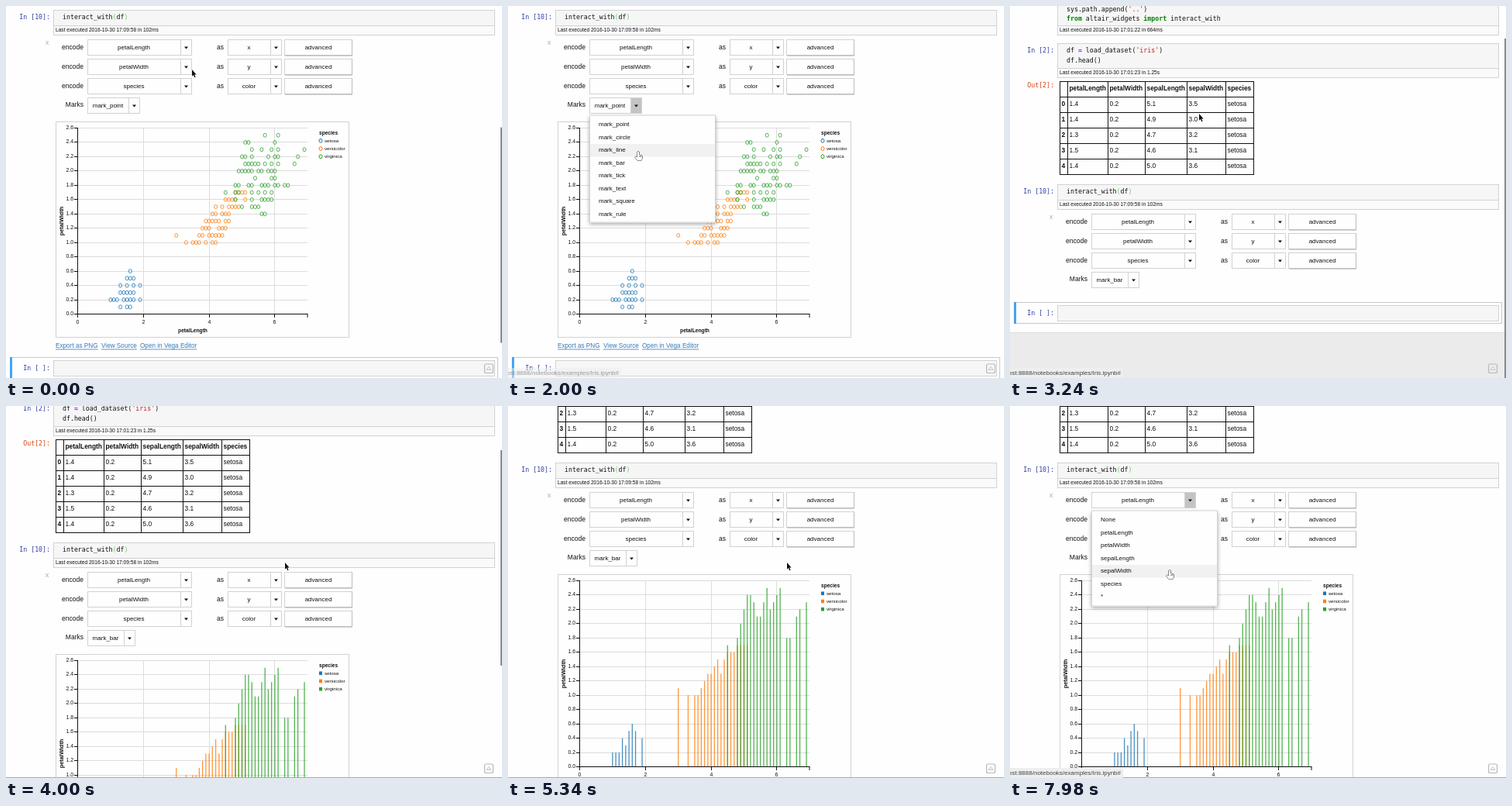
Write an HTML page with a canvas that moves like this. It is 640x480 px and loops after 8000 ms.

```html
<!DOCTYPE html>
<html lang="en">
<head>
<meta charset="utf-8">
<title>Notebook chart widget</title>
<style>
html, body { margin: 0; width: 100%; height: 100%; overflow: hidden; background: #fefefe; }
canvas { display: block; width: 640px; height: 480px; }
</style>
</head>
<body>
<canvas id="stage"></canvas>
<script>
const canvas = document.getElementById('stage');
const ctx = canvas.getContext('2d');
const ratio = window.devicePixelRatio || 1;
canvas.width = 640 * ratio;
canvas.height = 480 * ratio;

const LOOP = 8000;
const SANS = '"Liberation Sans", Arial, sans-serif';
const MONO = '"DejaVu Sans Mono", monospace';
const INK = '#111', PAGE = '#fefefe', CELL = '#f6f6f6', LINE = '#d2d2d2', GRID = '#dcdcdc';

// Moments at which the interface switches state.
const MARK_MENU = 1500, MARK_PICKED = 2800, CHART_BACK = 3350, FIELD_MENU = 7150;

const clamp = v => Math.min(1, Math.max(0, v));
const ramp = (t, from, to) => clamp((t - from) / (to - from));
const smooth = u => u * u * (3 - 2 * u);
const noise = (a, b) => Math.abs(Math.sin(a * 12.9898 + b * 78.233) * 43758.5453) % 1;

// Keys are [position, ...values]; eases between neighbours.
function track(keys, t) {
  let i = 0;
  while (i < keys.length - 2 && t >= keys[i + 1][0]) i++;
  const [a, b] = [keys[i], keys[i + 1]];
  const u = smooth(ramp(t, a[0], b[0]));
  return a.slice(1).map((v, k) => v + (b[k + 1] - v) * u);
}

// In tenths: for every petal length, widths are scattered between a low and a high curve.
const species = [
  { name: 'setosa', color: '#1f77b4', density: .75, gaps: [18],
    low: [[10, 2], [14, 1], [19, 2]],
    high: [[10, 2], [12, 2], [13, 4], [14, 3], [16, 6], [19, 4]] },
  { name: 'versicolor', color: '#ff7f0e', density: .6, gaps: [31, 32, 34],
    low: [[30, 11], [35, 10], [41, 10], [51, 16]],
    high: [[30, 11], [35, 10], [40, 13], [42, 15], [43, 13], [45, 16], [51, 17]] },
  { name: 'virginica', color: '#2ca02c', density: .4, gaps: [46, 47, 62, 65, 68],
    low: [[45, 17], [51, 15], [56, 14], [62, 18], [69, 23]],
    high: [[45, 17], [48, 18], [51, 24], [55, 21], [57, 25], [58, 22], [61, 25], [63, 18], [69, 23]] },
];
for (const kind of species) {
  kind.points = [];
  const { low, high, gaps, density } = kind;
  for (let length = high[0][0]; length <= high.at(-1)[0]; length++) {
    if (gaps.includes(length)) continue;
    const top = Math.round(track(high, length));
    for (let w = Math.min(top, Math.round(track(low, length))); w <= top; w++)
      if (w === top || noise(length, w) < density) kind.points.push([length / 10, w / 10, w === top]);
  }
}

function text(str, x, y, { size = 8, color = INK, align = 'left', bold = false, font = SANS } = {}) {
  ctx.font = `${bold ? 'bold ' : ''}${size}px ${font}`;
  ctx.fillStyle = color;
  ctx.textAlign = align;
  ctx.textBaseline = 'middle';
  ctx.fillText(str, x, y);
}

// Each part is [string, color, bold].
function code(parts, y) {
  let x = 73;
  for (const [str, color = INK, bold] of parts) {
    text(str, x, y, { size: 8.25, font: MONO, color, bold });
    x += ctx.measureText(str).width;
  }
}

function fill(x, y, w, h, color) {
  ctx.fillStyle = color;
  ctx.fillRect(x, y, w, h);
}

function box(x, y, w, h, color, border = LINE) {
  fill(x, y, w, h, color);
  ctx.strokeStyle = border;
  ctx.lineWidth = 1;
  ctx.strokeRect(x + .5, y + .5, w - 1, h - 1);
}

function line(x1, y1, x2, y2, color = INK, width = 1) {
  ctx.strokeStyle = color;
  ctx.lineWidth = width;
  ctx.beginPath();
  ctx.moveTo(x1, y1);
  ctx.lineTo(x2, y2);
  ctx.stroke();
}

function shape(path, color, outline) {
  const p = new Path2D(path);
  if (outline) {
    ctx.strokeStyle = outline;
    ctx.lineWidth = 1;
    ctx.stroke(p);
  }
  ctx.fillStyle = color;
  ctx.fill(p);
}

function executedCell(top, bottom, stamp) {
  box(61, top, 570, bottom - top - 12, CELL);
  box(61, bottom - 13, 570, 13, '#fafafa');
  text('Last executed 2016-10-30 ' + stamp, 64, bottom - 7, { size: 6.6 });
}

function prompt(label, y, color = '#303f9f') {
  text(label, 57, y, { size: 8.25, font: MONO, align: 'right', color });
}

function codeCells() {
  const key = '#008000', str = '#ba2121', bracket = '#5fcf5f';
  executedCell(-190, -119, '17:01:22 in 664ms');
  code([['sys.path.append('], ["'..'", str], [')']], -152);
  code([['from', key, true], [' altair_widgets '], ['import', key, true], [' interact_with']], -140);

  executedCell(-109, -64, '17:01:23 in 1.25s');
  prompt('In [2]:', -99);
  code([['df '], ['=', '#a2f', true], [' load_dataset('], ["'iris'", str], [')']], -99);
  code([['df.head()']], -86);

  executedCell(73, 106, '17:09:58 in 102ms');
  prompt('In [10]:', 83);
  code([['interact_with'], ['(', bracket], ['df'], [')', bracket]], 83);
}

function dataTable() {
  const edges = [64, 74, 126, 174, 228, 278, 314];
  const rows = [
    ' petalLength petalWidth sepalLength sepalWidth species',
    '0 1.4 0.2 5.1 3.5 setosa',
    '1 1.4 0.2 4.9 3.0 setosa',
    '2 1.3 0.2 4.7 3.2 setosa',
    '3 1.5 0.2 4.6 3.1 setosa',
    '4 1.4 0.2 5.0 3.6 setosa',
  ];
  prompt('Out[2]:', -54, '#d84315');
  rows.forEach((row, r) => row.split(' ').forEach((value, c) =>
    text(value, edges[c] + 2.5, -50 + r * 20, { size: 8.4, bold: !r || !c })));
  edges.forEach(x => line(x + .5, -60, x + .5, 60));
  for (let y = -60; y <= 60; y += 20) line(64, y + .5, 315, y + .5);
}

function select(label, x, y, width, mouse, open = false) {
  const cx = x + width - 7.5;
  const hover = Math.abs(mouse.x - cx) < 7 && Math.abs(mouse.y - mouse.dy - y) < 10;
  box(x, y - 10.5, width, 21, PAGE);
  box(x + width - 15, y - 10.5, 15, 21, open ? '#c4c4c4' : hover ? '#e2e2e2' : PAGE);
  text(label, x + (width - 15) / 2, y, { align: 'center' });
  shape(`M${cx - 2.5} ${y - 1}h5l-2.5 3z`, INK);
}

function controls(t, mouse) {
  text('x', 53, 115.5, { size: 8.5, align: 'center', color: '#aaa' });
  [['petalLength', 'x'], ['petalWidth', 'y'], ['species', 'color']].forEach(([field, channel], i) => {
    const y = 121.5 + i * 25;
    text('encode', 100, y, { size: 8.5, align: 'right' });
    select(field, 105, y, 135, mouse, !i && t > FIELD_MENU);
    text('as', 272, y, { size: 8.5 });
    select(channel, 286, y, 70, mouse);
    box(359, y - 10.5, 88, 21, PAGE);
    line(360, y + 10.5, 447, y + 10.5, '#a8a8a8');
    line(446.5, y - 10, 446.5, y + 10, '#bbb');
    text('advanced', 403, y, { align: 'center' });
  });
  text('Marks', 100, 196, { size: 8.5, align: 'right' });
  if (t > MARK_PICKED) select('mark_bar', 105, 196.5, 62, mouse);
  else select('mark_point', 105, 196.5, 68, mouse, t > MARK_MENU);
}

function chart(bars) {
  const px = v => 92.5 + v * 42.4, py = v => 465.5 - v * 92.3;
  box(64, 217, 379, 279, PAGE);
  for (let i = 0; i <= 13; i++) {
    const y = Math.floor(py(i / 5)) + .5;
    line(93, y, 389, y, GRID);
    line(88, y, 92.5, y);
    text((i / 5).toFixed(1), 87, y, { size: 6.9, align: 'right' });
  }
  for (let v = 0; v < 7; v += 2) {
    const x = Math.floor(px(v)) + .5;
    if (v) line(x, 225.5, x, 465, GRID);
    line(x, 465.5, x, 470);
    text(String(v), x, 476, { size: 6.9, align: 'center' });
  }
  line(92.5, 225, 92.5, 466);
  line(92.5, 465.5, 389.5, 465.5);
  line(389, 465.5, 389, 470);

  text('petalLength', 241, 487, { size: 6.7, bold: true, align: 'center' });
  ctx.save();
  ctx.translate(72, 345.5);
  ctx.rotate(-Math.PI / 2);
  text('petalWidth', 0, 0, { size: 7.4, bold: true, align: 'center' });
  ctx.restore();

  const ring = (x, y, color) => {
    ctx.strokeStyle = color;
    ctx.lineWidth = 1;
    ctx.beginPath();
    ctx.ellipse(x, y, 2, 2.5, 0, 0, 7);
    ctx.stroke();
  };
  text('species', 404, 232, { size: 6.6, bold: true });
  species.forEach(({ name, points, color }, i) => {
    ctx.globalAlpha = .8;
    for (const [length, width, isTop] of points) {
      const x = px(length), y = py(width);
      if (!bars) ring(x, y, color);
      else if (isTop) fill(x - .65, y, 1.3, 465 - y, color);
    }
    ctx.globalAlpha = 1;
    const y = 241.8 + i * 10.2;
    if (bars) fill(404, y - 2.3, 4, 4.6, color); else ring(406, y, color);
    text(name, 411, y, { size: 6.2 });
  });

  for (const [label, x] of [['Export as PNG', 64], ['View Source', 123], ['Open in Vega Editor', 173]]) {
    text(label, x, 506.5, { size: 8.2, color: '#337ab7' });
    line(x, 511, x + ctx.measureText(label).width, 511, '#337ab7', .8);
  }
}

function emptyCell(y) {
  box(5, y - 15, 630, 28, PAGE, '#c8c8c8');
  fill(5, y - 15, 3, 28, '#42a5f5');
  box(61, y - 11, 570, 21, CELL);
  prompt('In [ ]:', y);
}

function menu(items, top, height, mouse) {
  ctx.save();
  ctx.shadowColor = 'rgba(0, 0, 0, .35)';
  ctx.shadowBlur = 5 * ratio;
  ctx.shadowOffsetY = 2 * ratio;
  fill(105, top, 163, height, PAGE);
  ctx.restore();
  box(105, top, 163, height, PAGE);
  items.forEach((item, i) => {
    const y = top + 12.5 + i * 16.5;
    if (Math.abs(mouse.y - mouse.dy - y) < 8.25) fill(106, y - 8, 161, 16.5, '#f1f1f1');
    text(item, 117, y);
  });
}

function statusBar(alpha) {
  ctx.globalAlpha = alpha;
  fill(0, 467, 146, 13, '#eee');
  text('localhost:8888/notebooks/examples/Iris.ipynb#', 143, 473.5, { align: 'right', color: '#444' });
  ctx.globalAlpha = 1;
}

function cursor({ x, y }, hand) {
  ctx.save();
  ctx.translate(x, y);
  if (hand) {
    shape('M-1 0h2l.4 4 3.6 1 .4 3-1.4 3.5h-5l-3-4 .6-1.5 2.4 1z', '#fff', '#222');
    line(2, 5, 2, 7, '#222', .7);
    line(3.7, 5.5, 3.7, 7, '#222', .7);
  } else {
    shape('M0 0v8.8l1.9-1.8 1.3 3.3 1.4-.6-1.4-3.1 2.4-.2z', '#111', '#fff');
  }
  ctx.restore();
}

function scrollButton() {
  ctx.strokeStyle = '#b8b8b8';
  ctx.lineWidth = 1.2;
  ctx.beginPath();
  ctx.roundRect(617.5, 462, 11, 11.5, 2);
  ctx.stroke();
  shape('M620 469.5h6l-3-4z', '#eee', '#aaa');
}

function draw(t) {
  const hasChart = t < MARK_PICKED || t > CHART_BACK;
  const dy = t < MARK_PICKED ? -68 : Math.round(track([[3755, 157], [4380, 0]], t)[0]);
  const [x, y] = track([[200, 240, 82], [1050, 167, 127], [1600, 167, 127], [2000, 168, 188],
    [2300, 168, 203], [2820, 168, 203], [3200, 244, 139], [3300, 244, 139], [3750, 360, 202],
    [5600, 360, 202], [6400, 238, 124], [7350, 238, 124], [7900, 206, 212]], t);
  const mouse = { x, y, dy };

  ctx.setTransform(ratio, 0, 0, ratio, 0, 0);
  fill(0, 0, 640, 480, PAGE);
  ctx.save();
  ctx.translate(0, dy);
  codeCells();
  dataTable();
  controls(t, mouse);
  if (hasChart) chart(t > MARK_PICKED);
  else {
    fill(0, 264, 640, 240, '#ebebeb');
    line(0, 264.5, 640, 264.5, '#dcdcdc');
  }
  emptyCell(hasChart ? 536 : 240);
  if (t > MARK_MENU && t < MARK_PICKED)
    menu(['point', 'circle', 'line', 'bar', 'tick', 'text', 'square', 'rule'].map(m => 'mark_' + m), 208.5, 139, mouse);
  if (t > FIELD_MENU)
    menu(['None', 'petalLength', 'petalWidth', 'sepalLength', 'sepalWidth', 'species', '*'], 134.5, 124, mouse);
  ctx.restore();

  if (t > CHART_BACK) fill(0, 479, 640, 1, '#aaa');
  scrollButton();
  statusBar(t < 5000 ? ramp(t, 1900, 2100) - ramp(t, 3280, 3400) : ramp(t, 7600, 7850));

  ctx.globalAlpha = 1 - (t < MARK_PICKED ? ramp(t, 300, 650) : ramp(t, 4700, 5000));
  if (hasChart) fill(638, 117 - dy * .583, 2, 278, '#8a8a8a');
  else fill(638, 42, 2, 438, '#8a8a8a');
  ctx.globalAlpha = 1;

  cursor(mouse, (t > 950 && t < 2860) || t > 6330);
}

function tick() {
  draw(performance.now() % LOOP);
  requestAnimationFrame(tick);
}
tick();
</script>
</body>
</html>
```
